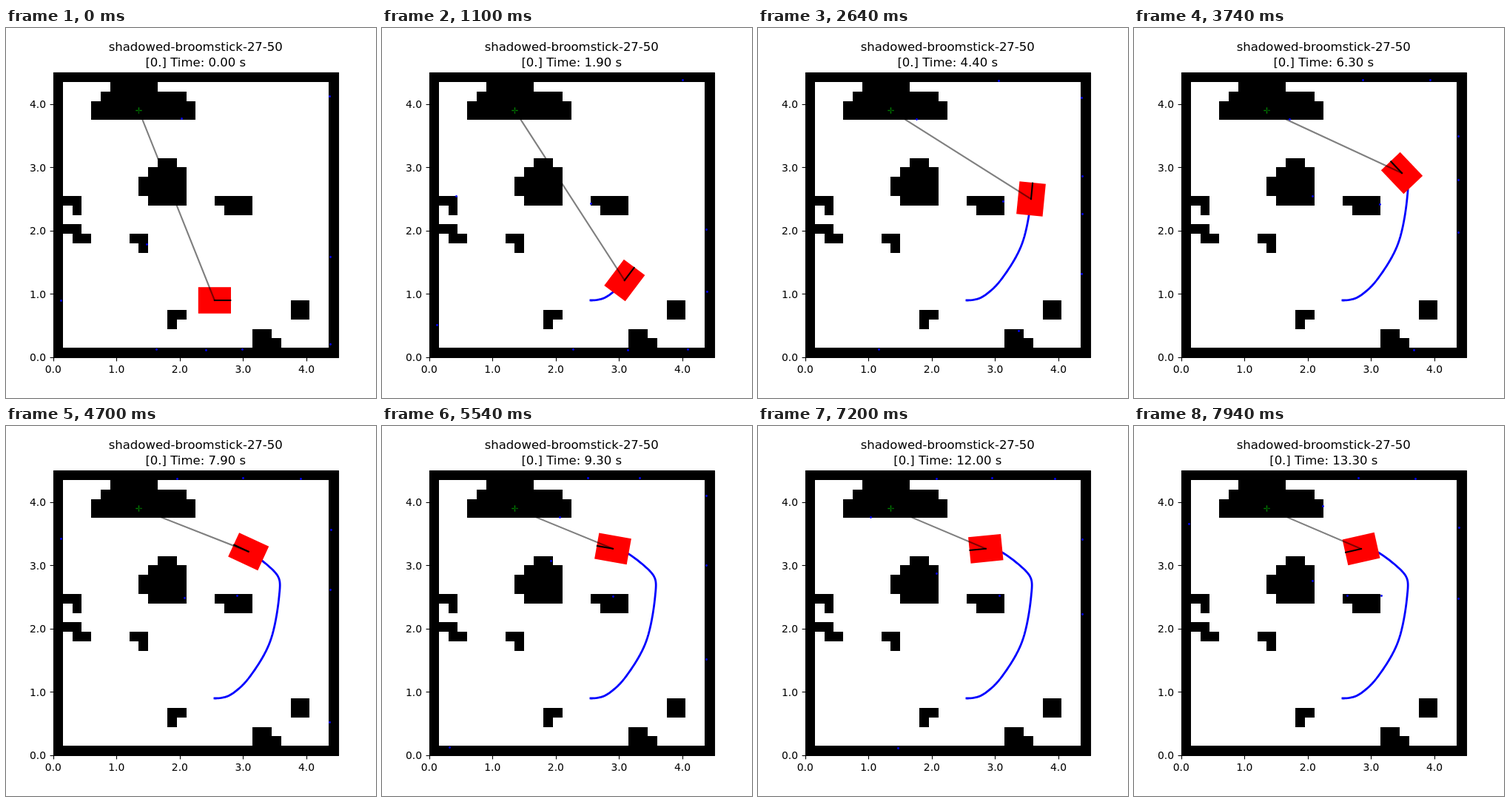
An HTML page with a canvas that plays this animation: 500x500 px, repeating every 8 s.

```html
<!DOCTYPE html>
<html lang="en">
<head>
<meta charset="utf-8">
<title>Robot navigation plot</title>
<style>
  html, body { margin: 0; width: 100%; height: 100%; overflow: hidden; background: #fff; }
  canvas { display: block; }
</style>
</head>
<body>
<canvas id="stage" width="500" height="500"></canvas>
<script>
const ctx = document.getElementById("stage").getContext("2d");
const LOOP = 8000, STEPS = 134;
const LEFT = 63.75, TOP = 60, SIZE = 385, BOTTOM = TOP + SIZE;
const UNIT = SIZE / 4.5, CELLS = 30, CELL = SIZE / CELLS;
const GOAL = { x: 179.5, y: 111.5 };

// Obstacle outlines in cell units
const HOOK = "h2v2h-1v-1h-1z";
const obstacles = new Path2D(`
  M6 1h5v1h3v1h1v2H4V3h1V2h1z
  M11 9h2v1h1v4h-4v-1H9v-2h1v-1h1z
  M17 13h4v2h-3v-1h-1z
  M1 13${HOOK} M8 17${HOOK}
  M1 16h2v1h1v1h-2v-1h-1z
  M12 25h2v1h-1v1h-1z
  M25 24h2v2h-2z
  M21 27h2v1h1v1h-3z`);

const isEdge = i => i <= 0 || i >= CELLS - 1;
const grid = Array.from({ length: CELLS }, (_, row) => Array.from({ length: CELLS }, (_, col) =>
  isEdge(row) || isEdge(col) || ctx.isPointInPath(obstacles, col + 0.5, row + 0.5)));

// Key poses of the drive; heading in degrees, counter-clockwise from the x axis
const KEYS = [
  [0, 281.9, 368, 0], [10, 298.3, 365.6, 18], [19, 327.8, 341, 53], [31, 357, 291, 70],
  [44, 369, 231, 84.4], [63, 362, 196, 133.6], [79, 327.7, 169.7, 155.2],
  [98, 309.5, 165.7, 175.2], [110, 308.4, 165.7, 185.3], [125, 307.5, 165.8, 185.8],
  [133, 307, 166, 192.6]
].map(([step, x, y, degrees]) => ({ step, x, y, heading: radians(degrees) }));

function radians(degrees) {
  return degrees * Math.PI / 180;
}

function meanSpeed(a, b) {
  return Math.hypot(b.x - a.x, b.y - a.y) / (b.step - a.step);
}

// The robot starts and ends at rest; in between, speed blends the two adjoining legs.
KEYS.forEach((key, i) => {
  const before = KEYS[i - 1], after = KEYS[i + 1];
  key.speed = before && after ? Math.sqrt(meanSpeed(before, key) * meanSpeed(key, after)) : 0;
});

function hermite(a, b, slopeA, slopeB, u) {
  const u2 = u * u, u3 = u2 * u;
  return a * (2 * u3 - 3 * u2 + 1) + slopeA * (u3 - 2 * u2 + u)
       + b * (3 * u2 - 2 * u3) + slopeB * (u3 - u2);
}

function poseAt(step) {
  const i = Math.max(1, KEYS.findIndex(key => key.step >= step));
  const a = KEYS[i - 1], b = KEYS[i];
  const span = b.step - a.step, u = (step - a.step) / span;
  const runA = a.speed * span, runB = b.speed * span;
  return {
    x: hermite(a.x, b.x, runA * Math.cos(a.heading), runB * Math.cos(b.heading), u),
    y: hermite(a.y, b.y, -runA * Math.sin(a.heading), -runB * Math.sin(b.heading), u),
    heading: a.heading + (b.heading - a.heading) * u
  };
}

const poses = Array.from({ length: STEPS }, (_, step) => poseAt(step));

function ahead({ x, y }, angle, distance) {
  return { x: x + distance * Math.cos(angle), y: y - distance * Math.sin(angle) };
}

function isBlocked({ x, y }) {
  const col = Math.floor((x - LEFT) / CELL), row = Math.floor((y - TOP) / CELL);
  return isEdge(col) || isEdge(row) || grid[row][col];
}

function castRay(from, angle) {
  let distance = 0;
  while (!isBlocked(ahead(from, angle, distance))) distance += 0.5;
  return ahead(from, angle, distance + 2.3);
}

function line(points, color, width) {
  ctx.beginPath();
  for (const p of points) ctx.lineTo(p.x, p.y);
  ctx.strokeStyle = color;
  ctx.lineWidth = width;
  ctx.stroke();
}

function text(string, x, y, size, align) {
  ctx.font = `${size}px "DejaVu Sans", sans-serif`;
  ctx.textAlign = align;
  ctx.fillText(string, x, y);
}

// Centre of the pixel that a crisp plot element snaps to
const snap = v => Math.round(v) + 0.5;

function drawPlot(step) {
  ctx.fillStyle = "#fff";
  ctx.fillRect(0, 0, 500, 500);
  ctx.fillStyle = "#000";
  const colX = col => Math.round(LEFT + 0.2 + col * CELL);
  const rowY = row => Math.round(TOP + row * CELL);
  grid.forEach((cells, row) => cells.forEach((filled, col) => {
    const x = colX(col), y = rowY(row);
    if (filled) ctx.fillRect(x, y, colX(col + 1) - x, rowY(row + 1) - y);
  }));

  ctx.lineCap = "butt";
  ctx.strokeStyle = "#000";
  ctx.lineWidth = 1.11;
  ctx.strokeRect(snap(LEFT), snap(TOP), SIZE, SIZE);
  for (let i = 0; i <= 4; i++) {
    const x = LEFT + i * UNIT, y = BOTTOM - i * UNIT;
    line([{ x: snap(x), y: 445.5 }, { x: snap(x), y: 450.4 }], "#000", 1.11);
    line([{ x: 64.5, y: snap(y) }, { x: 59.6, y: snap(y) }], "#000", 1.11);
    text(i + ".0", x, 466, 13.89, "center");
    text(i + ".0", 54, Math.ceil(y + 5), 13.89, "right");
  }
  const middle = LEFT + SIZE / 2;
  text("shadowed-broomstick-27-50", middle, 31, 16.5, "center");
  text(`[0.] Time: ${(step / 10).toFixed(2)} s`, middle, 52, 16.5, "center");
}

function drawRobot(step) {
  const pose = poses[step], { x, y, heading } = pose;
  ctx.lineCap = "square";
  ctx.lineJoin = "round";
  if (step) line(poses.slice(0, step + 1), "#00f", 2.78);

  ctx.save();
  ctx.translate(x, y);
  ctx.rotate(-heading);
  ctx.fillStyle = "#f00";
  ctx.fillRect(-22.1, -17.8, 44.2, 35.6);
  ctx.restore();

  ctx.lineCap = "butt";
  for (const angle of [0, Math.PI / 2])
    line([ahead(GOAL, angle, -4.2), ahead(GOAL, angle, 4.2)], "#008000", 1.39);

  ctx.lineCap = "square";
  line([pose, GOAL], "rgba(0,0,0,.5)", 2.08);
  line([pose, ahead(pose, heading, UNIT / 4)], "#000", 2.08);

  // Nine range readings spread symmetrically around the rear
  ctx.fillStyle = "#00f";
  for (let k = -4; k <= 4; k++) {
    const hit = castRay(pose, heading + Math.PI + radians(39.8 * k));
    ctx.beginPath();
    ctx.arc(snap(hit.x), snap(hit.y), 1.4, 0, 2 * Math.PI);
    ctx.fill();
  }
}

// Steps alternate between 20 ms and 100 ms.
function frame(now) {
  const t = now % LOOP;
  const step = Math.min(STEPS - 1, 2 * Math.floor(t / 120) + (t % 120 >= 20 ? 1 : 0));
  drawPlot(step);
  drawRobot(step);
  requestAnimationFrame(frame);
}
requestAnimationFrame(frame);
</script>
</body>
</html>
```
